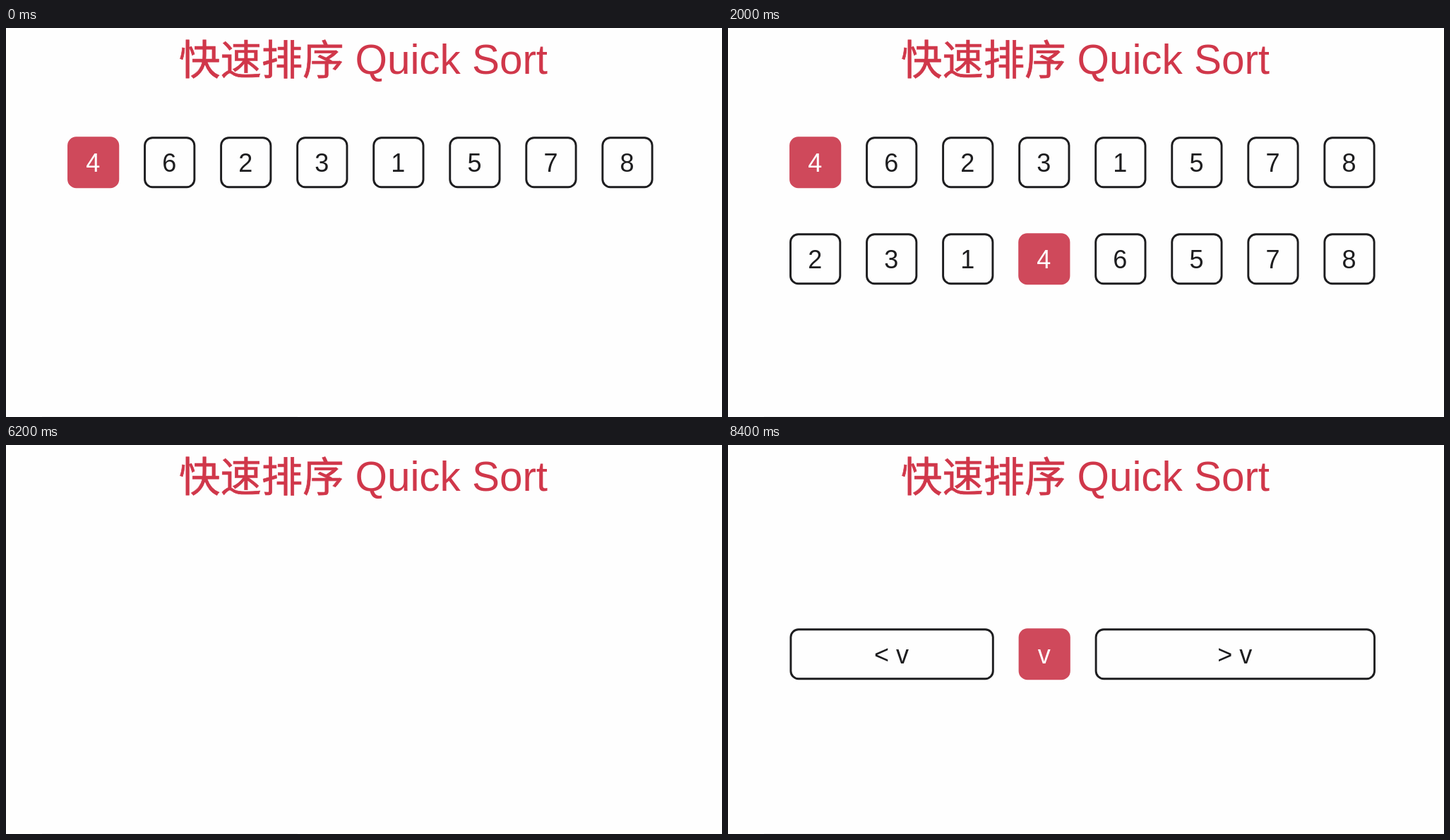
These frames come from a looping animation (1014 by 552 pixels, 10 s). An HTML page:

```html
<!DOCTYPE html>
<html lang="zh">
<head>
<meta charset="utf-8">
<title>Quick Sort</title>
<style>
  html, body { margin: 0; height: 100%; overflow: hidden; background: #fefefe; }
  svg { display: block; font: 36px "Liberation Sans", Arial, sans-serif; }
  .title { font-size: 58.4px; fill: #d0374a; }
  .han { font-family: "Noto Sans CJK SC", "Noto Sans CJK", sans-serif; stroke: #d0374a; stroke-width: 0.7; }
  .cell { text-anchor: middle; }
  .cell rect { fill: none; stroke: #1d1d1f; stroke-width: 2.9; }
  .cell text { fill: #1d1d1f; }
  .pivot rect { fill: #cf495b; stroke: #cf495b; }
  .pivot text { fill: #fff; }
</style>
</head>
<body>
<svg id="stage" width="1014" height="552" viewBox="0 0 1014 552">
  <text class="title han" x="245" y="66">快速排序</text>
  <text class="title" x="494.5" y="65">Quick Sort</text>
  <rect x="51" y="551" width="362" height="1" fill="#f4f4f4"/>
</svg>
<script>
const LOOP = 10000, STEP = 200, CLEAR = 6200;
const PITCH = 108.05, SIZE = 73.3;
const stage = document.getElementById('stage');

// A cell is [label, slots it spans, is it the pivot].
function makeRow(cells, left = 87) {
  let slot = 0;
  const group = document.createElementNS('http://www.w3.org/2000/svg', 'g');
  group.innerHTML = cells.map(([label, span, pivot]) => {
    const x = left + slot * PITCH;
    const width = (span - 1) * PITCH + SIZE;
    slot += span;
    return `<g class="cell ${pivot ? 'pivot' : ''}">
      <rect x="${x + 1.5}" y="1.8" width="${width - 3}" height="69.9" rx="11"/>
      <text x="${x + width / 2 - 0.5}" y="49.6">${label}</text></g>`;
  }).join('');
  return stage.appendChild(group);
}

const digits = text => [...text].map(d => [d, 1, d === '4']);
const parts = v => [['&lt; ' + v, 3], [v, 1, true], ['&gt; ' + v, 4]];

// Each row climbs through its tops, one per step, then rests on the last.
const rows = [
  { node: makeRow(digits('46231578')), start: 0, end: CLEAR, tops: [154] },
  { node: makeRow(digits('23146578')), start: 1000, end: CLEAR, tops: [519, 461, 410, 353, 302, 291] },
  { node: makeRow(parts('4')), start: 3200, end: CLEAR, tops: [546, 520, 491, 462, 436, 426] },
  { node: makeRow(parts('v'), 87.4), start: 7400, end: LOOP, tops: [516, 453, 389, 332, 268, 260] },
];

function draw(time) {
  const t = time % LOOP;
  for (const { node, start, end, tops } of rows) {
    const step = Math.floor((t - start) / STEP);
    const top = tops[Math.max(0, Math.min(step, tops.length - 1))];
    node.setAttribute('visibility', t >= start && t < end ? 'visible' : 'hidden');
    node.setAttribute('transform', `translate(0 ${top})`);
  }
}

const begin = performance.now();
function tick() {
  draw(performance.now() - begin);
  requestAnimationFrame(tick);
}
tick();
</script>
</body>
</html>
```
